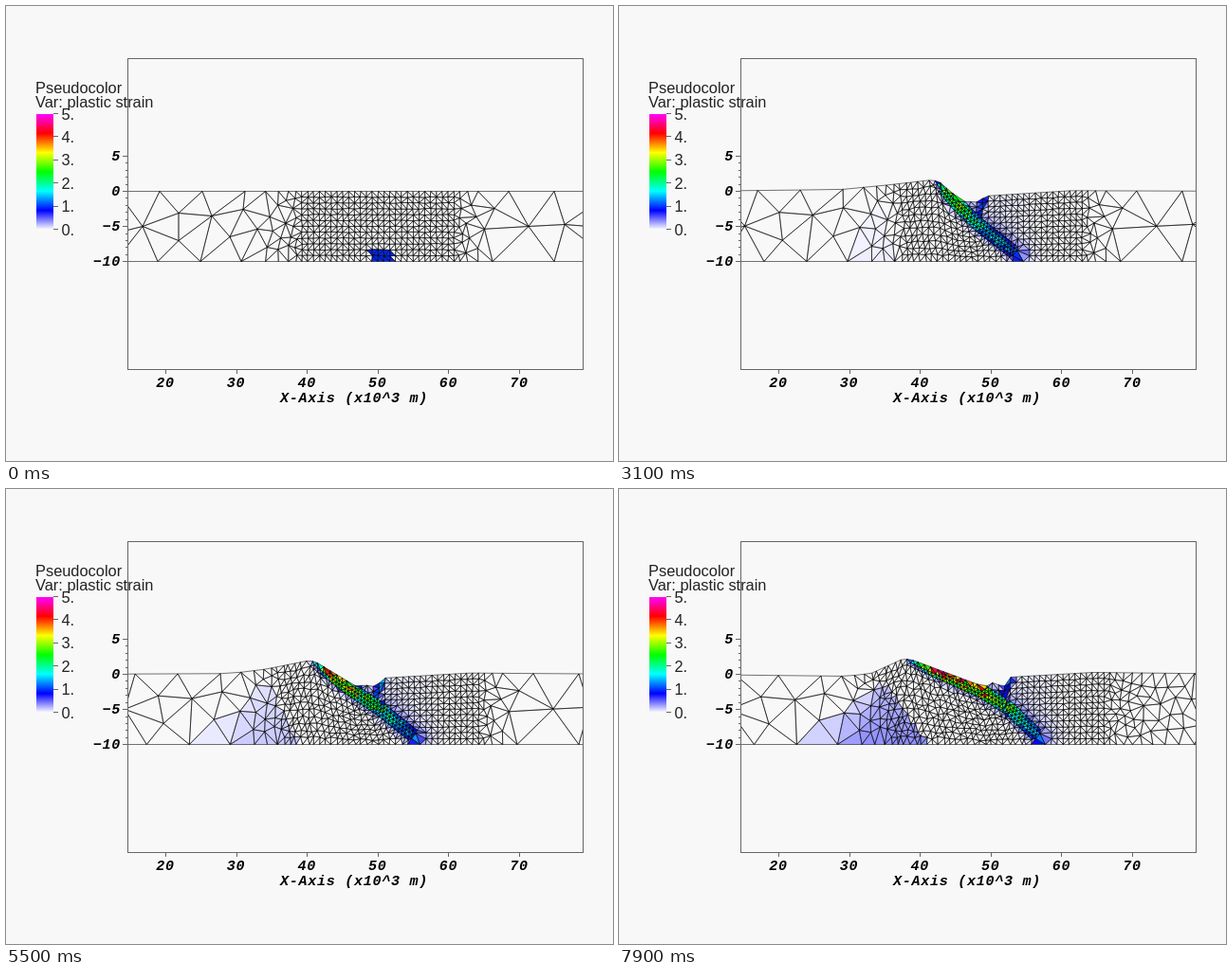
An HTML page with a canvas that plays this animation: 640 by 480 pixels, repeating every 8 s.

```html
<!DOCTYPE html>
<html lang="en">
<head>
<meta charset="utf-8">
<title>Plastic strain</title>
<style>
html, body { margin: 0; width: 100%; height: 100%; overflow: hidden; background: #f8f8f8; }
canvas { display: block; }
</style>
</head>
<body>
<canvas id="stage" width="640" height="480"></canvas>
<script>
const ctx = document.getElementById('stage').getContext('2d');
const TOP = 195.5, BOTTOM = 269.5, DEPTH = BOTTOM - TOP;
const EDGE = 312, ROWS = 12, COLS = 26, CELL = DEPTH / ROWS;
const RIGHT = EDGE + COLS * CELL;
const STOPS = ['#fff', '#00f', '#0ff', '#0f0', '#ff0', '#f00', '#f0f'];
const RGB = STOPS.map(s => [...s.slice(1)].map(c => parseInt(c, 16) * 17));

const clamp = (v, a = 0, b = 1) => Math.min(b, Math.max(a, v));
const mix = (a, b, f) => a + (b - a) * f;
const hash = (i, j) => {
  const v = Math.sin(i * 12.9898 + j * 78.233) * 43758.5453;
  return v - Math.floor(v);
};

function colour(v) {
  const p = clamp(v / 5 * 6, 0, 5.999), i = Math.floor(p);
  return `rgb(${RGB[i].map((c, k) => Math.round(mix(c, RGB[i + 1][k], p - i)))})`;
}

// Other coordinate of a polyline where coordinate `axis` equals v
function along(line, v, axis) {
  let i = 1;
  while (i < line.length - 1 && line[i][axis] < v) i++;
  const a = line[i - 1], b = line[i];
  return mix(a[1 - axis], b[1 - axis], clamp((v - a[axis]) / (b[axis] - a[axis] || 1)));
}

// Distance to a polyline and the position along it, in segments
function near(x, y, line) {
  let best = [1e9, 0];
  for (let i = 1; i < line.length; i++) {
    const [ax, ay] = line[i - 1], dx = line[i][0] - ax, dy = line[i][1] - ay;
    const f = clamp(((x - ax) * dx + (y - ay) * dy) / (dx * dx + dy * dy || 1));
    const d = Math.hypot(x - ax - f * dx, y - ay - f * dy);
    if (d < best[0]) best = [d, i - 1 + f];
  }
  return best;
}

const coarse = (tops, bottoms, inner) =>
  [...tops.map(x => [x, 0]), ...bottoms.map(x => [x, DEPTH]), ...inner];

// Points that grow sparser away from the fine block
function graded(edge, dir, slope, end, fixed) {
  const size = u => 6.2 + slope * u;
  const pts = [...fixed];
  for (const y of [0, DEPTH])
    for (let u = size(0); u < end; u += size(u)) pts.push([edge + dir * u, y]);
  for (let k = 0; k < 2500; k++) {
    const u = mix(5, end, hash(k, 1)), y = DEPTH * hash(k, 2);
    const x = edge + dir * u, h = size(u);
    if (Math.min(y, DEPTH - y) > h / 2 && pts.every(p => Math.hypot(p[0] - x, p[1] - y) > h * .85))
      pts.push([x, y]);
  }
  return pts;
}

const LEFT_SIDE = graded(EDGE, -1, .3, 56, coarse([80, 117, 162, 207, 252], [80, 115, 160, 205, 248],
  [[112, 45], [144, 37], [182, 23], [182, 52], [217, 26], [236, 48], [250, 19]]));
// the right side is remeshed finer as it is pushed outwards
const RIGHT_SIDES = [
  graded(RIGHT, 1, .33, 38, coarse([530, 578, 640], [513, 578, 640], [[515, 18], [551, 37], [589, 35], [640, 39]])),
  graded(RIGHT, 1, .24, 160, []),
  graded(RIGHT, 1, .13, 160, [])
];

function delaunay(pts) {
  const n = pts.length;
  // a slight bulge keeps the outline convex
  const q = pts.map(([x, y]) => [x, (y - DEPTH / 2) * (1 + .03 * (1 - ((x - 370) / 300) ** 2))]);
  q.push([-1e5, -1e5], [300, 2e5], [1e5, -1e5]);
  const circle = (a, b, c) => {
    const [ax, ay] = q[a], bx = q[b][0] - ax, by = q[b][1] - ay, cx = q[c][0] - ax, cy = q[c][1] - ay;
    const d = 2 * (bx * cy - by * cx) || 1e-9, bb = bx * bx + by * by, cc = cx * cx + cy * cy;
    const ux = (cy * bb - by * cc) / d, uy = (bx * cc - cx * bb) / d;
    return { v: [a, b, c], x: ax + ux, y: ay + uy, r: ux * ux + uy * uy };
  };
  let tris = [circle(n, n + 1, n + 2)];
  for (let i = 0; i < n; i++) {
    const [x, y] = q[i], rim = new Map();
    tris = tris.filter(t => {
      if ((x - t.x) ** 2 + (y - t.y) ** 2 >= t.r) return true;
      t.v.forEach((a, k) => {
        const b = t.v[(k + 1) % 3], id = Math.min(a, b) * 4096 + Math.max(a, b);
        if (!rim.delete(id)) rim.set(id, [a, b]);
      });
      return false;
    });
    for (const [a, b] of rim.values()) tris.push(circle(a, b, i));
  }
  return tris.map(t => t.v).filter(v => Math.max(...v) < n);
}

// Fast onset, then slow stretching
function stateAt(t) {
  const onset = clamp(t / .6), p = Math.max(0, (t - .6) / 7.3);
  const root = Math.sqrt(p), late = p ** 1.5;
  const at = (x, drop) => [x, TOP + drop];

  const peakX = 333 - 34 * p * p, rise = -6 * onset - 10 * root;
  const valley = at(361 + 25 * p ** 3, 7 * onset + 6.5 * root);
  const scarp = at(380 + 33 * late, 6 * onset - 3 * p);
  const scarpFoot = at(scarp[0] - 8, 7 * onset + 7.5 * root);
  const bump = [(valley[0] + scarpFoot[0]) / 2, (valley[1] + scarpFoot[1]) / 2 - 6 * p ** 4];
  const crest = at(peakX + 8, rise + 3 * onset * (1 - root));
  const endX = 396 + 6 * onset + 41 * p ** .8;
  return {
    t, onset, scarp, endX,
    spread: 10 * onset + 29 * late,
    strains: [1.4 + 2.5 * root, 1.5 + 2 * root, 1 + 1.5 * root, .9 + .2 * p].map(v => v * onset),
    surface: [
      at(60, 0),
      at(230 + 10 * p, -2 * onset + 4 * p ** 3),
      at(290 - 24 * p, -4 * onset - 4 * Math.sin(Math.PI * p) + 3 * p),
      at(peakX, rise), crest, valley, bump, scarpFoot, scarp,
      at(465 + 35 * p, -2 * p), at(680, 0)
    ],
    fault: [crest, [valley[0] - 4, valley[1] + 4], [373 + 39 * late, 232], [endX, 262]]
  };
}

function meshPoints(s) {
  const { t, spread, fault, surface } = s, pts = [];
  const moving = t > 0;
  const lift = (x, y) => {
    const top = along(surface, x, 0);
    return top + y * (BOTTOM - top) / DEPTH;
  };
  // the left block leans: its base lags behind
  const shift = (dir, y) => dir * spread * (dir < 0 ? 1 - .55 * y / DEPTH : 1);
  for (const [x, y] of LEFT_SIDE) pts.push([x + shift(-1, y), y]);
  for (const [x, y] of RIGHT_SIDES[t < 5.6 ? 0 : t < 7 ? 1 : 2]) pts.push([x + shift(1, y), y]);

  // two lattices part at the fault and uncover new cells
  for (const dir of [-1, 1]) {
    const jitter = dir < 0 ? .9 + .3 * t : .9;
    for (let i = dir < 0 ? 0 : -18; i <= (dir < 0 ? COLS + 18 : COLS); i++)
      for (let j = 0; j <= ROWS; j++) {
        const rim = j % ROWS === 0;
        const y = j * CELL + (rim ? 0 : (hash(j, i + 50) - .5) * jitter);
        const x = EDGE + i * CELL + shift(dir, y) + (hash(i, j) - .5) * jitter;
        const cy = lift(x, y);
        const split = j === 0 ? fault[1][0] : rim ? s.endX : along(fault, cy, 1);
        if ((x - split) * dir < (rim && moving ? 1.5 : 0)) continue;
        if (moving && !rim && near(x, cy, fault)[0] < 9.5) continue;
        pts.push([x, y]);
      }
  }

  // finer strip that follows the fault
  if (moving)
    for (let k = 1; k < fault.length; k++) {
      const [ax, ay] = fault[k - 1], dx = fault[k][0] - ax, dy = fault[k][1] - ay;
      const len = Math.hypot(dx, dy), n = Math.max(1, Math.round(len / 4.2));
      for (let i = 0; i < n; i++)
        for (let lane = -2; lane <= 2; lane++) {
          const f = (i + (lane & 1) / 2 + (hash(i, lane + k * 9) - .5) * .3) / n, off = lane * 3.5;
          const x = ax + dx * f + dy / len * off, cy = ay + dy * f - dx / len * off;
          const top = along(surface, x, 0), y = (cy - top) / (BOTTOM - top) * DEPTH;
          if (y > 2.2 && y < DEPTH - 3) pts.push([x, y]);
        }
    }
  return { pts, shown: pts.map(([x, y]) => [x, lift(x, y)]) };
}

function strainAt(x, y, s) {
  const { t, onset, fault, strains, endX, scarp } = s;
  if (t === 0) return Math.abs(x - 396) < 12 && y > 257 ? .95 : 0;
  const noise = .7 + .55 * hash(Math.floor(x / 4), Math.floor(y / 4));
  const band = (d, width, peak) => d < width ? peak * noise * (1 - (d / width) ** 3) : 0;

  const [d, q] = near(x, y, fault), i = Math.min(2, Math.floor(q));
  const width = Math.min(8.5, 4 + 1.3 * t) * (.5 + .5 * clamp(q * 2));
  const right = x > along(fault, y, 1);
  const core = mix(strains[i], strains[i + 1], q - i) * (.4 + .6 * clamp(q * 3));
  const halo = .3 * onset * Math.exp(Math.min(0, 1 - d / width) * (right ? 1.2 : 3));

  let v = Math.max(
    halo,
    band(d, width, core),
    // weak seed at the base
    band(near(x, y, [[endX - 16, 256], [endX + 8, 260]])[0], 5, 1.3 * clamp(1.2 - t / 4)),
    // steep branch below the scarp
    band(near(x, y, [scarp, [scarp[0] - 8, scarp[1] + 20]])[0], 5, 1.1 * clamp((t - 1.6) / 2)));

  if (right) v += .06 * onset * Math.exp(-(((x - scarp[0] - 20) / 35) ** 2));

  // broad wedge on the left
  const p = t / 7.9, h = (y - 208) / 61;
  const from = mix(mix(262, 270, p), mix(228, 184, p), h), to = mix(mix(266, 282, p), mix(272, 326, p), h);
  if (h > 0 && x > from && x < to)
    v += .34 * p * p * (.25 + .75 * clamp((x - from) / (to - from) * 2)) * (.6 + .5 * h);
  return v;
}

function line(x1, y1, x2, y2) {
  ctx.beginPath();
  ctx.moveTo(x1, y1);
  ctx.lineTo(x2, y2);
  ctx.stroke();
}

function drawAxes() {
  ctx.strokeStyle = '#666';
  ctx.lineWidth = 1;
  ctx.strokeRect(128.5, 55.5, 480, 328);
  ctx.fillStyle = '#000';
  ctx.font = 'italic bold 15px "Liberation Mono", monospace';
  ctx.letterSpacing = '.75px';
  ctx.textAlign = 'center';
  for (let v = 20; v <= 70; v += 10) {
    const x = 168 + (v - 20) * 7.46;
    line(Math.round(x) + .5, 384, Math.round(x) + .5, 388);
    ctx.fillText(v, x, 402);
  }
  ctx.fillText('X-Axis (x10^3 m)', 367, 418);
  ctx.textAlign = 'right';
  for (let v = 5; v >= -10; v--) {
    const y = Math.round(195 - v * 7.43) + .5;
    line(v % 5 ? 126 : 123, y, 128, y);
    if (v % 5 === 0) ctx.fillText(String(v).replace('-', '−'), 121, y + 4.5);
  }
  ctx.letterSpacing = '0px';
}

function drawLegend() {
  const bar = ctx.createLinearGradient(0, 236, 0, 114);
  STOPS.forEach((c, i) => bar.addColorStop(i / 6, c));
  ctx.fillStyle = bar;
  ctx.fillRect(32, 114, 18, 122);
  ctx.fillStyle = '#222';
  ctx.textAlign = 'left';
  ctx.font = '16.4px "Liberation Sans", Arial, sans-serif';
  ctx.fillText('Pseudocolor', 31, 92);
  ctx.fillText('Var: plastic strain', 31, 107);
  for (let v = 0; v <= 5; v++) {
    const y = 236 - v * 24.4;
    line(50, Math.round(y) - .5, 55, Math.round(y) - .5);
    ctx.fillText(v + '.', 58.5, y + 5.5);
  }
}

function draw(t) {
  ctx.fillStyle = '#f8f8f8';
  ctx.fillRect(0, 0, 640, 480);
  const s = stateAt(t), { pts, shown } = meshPoints(s);

  ctx.save();
  ctx.beginPath();
  ctx.rect(128, 55, 480, 328);
  ctx.clip();
  const mesh = new Path2D();
  for (const tri of delaunay(pts)) {
    const [a, b, c] = tri.map(i => shown[i]);
    const cell = new Path2D();
    cell.moveTo(...a);
    cell.lineTo(...b);
    cell.lineTo(...c);
    cell.closePath();
    mesh.addPath(cell);
    const v = strainAt((a[0] + b[0] + c[0]) / 3, (a[1] + b[1] + c[1]) / 3, s);
    if (v > .03) {
      ctx.fillStyle = colour(v);
      ctx.fill(cell);
    }
  }
  ctx.strokeStyle = '#000';
  ctx.lineWidth = .55;
  ctx.lineJoin = 'bevel';
  ctx.stroke(mesh);
  ctx.restore();

  drawAxes();
  drawLegend();
}

let last = -1;
function tick() {
  const step = Math.floor(performance.now() % 8000 / 100);
  if (step !== last) draw((last = step) / 10);
  requestAnimationFrame(tick);
}
tick();
</script>
</body>
</html>
```
